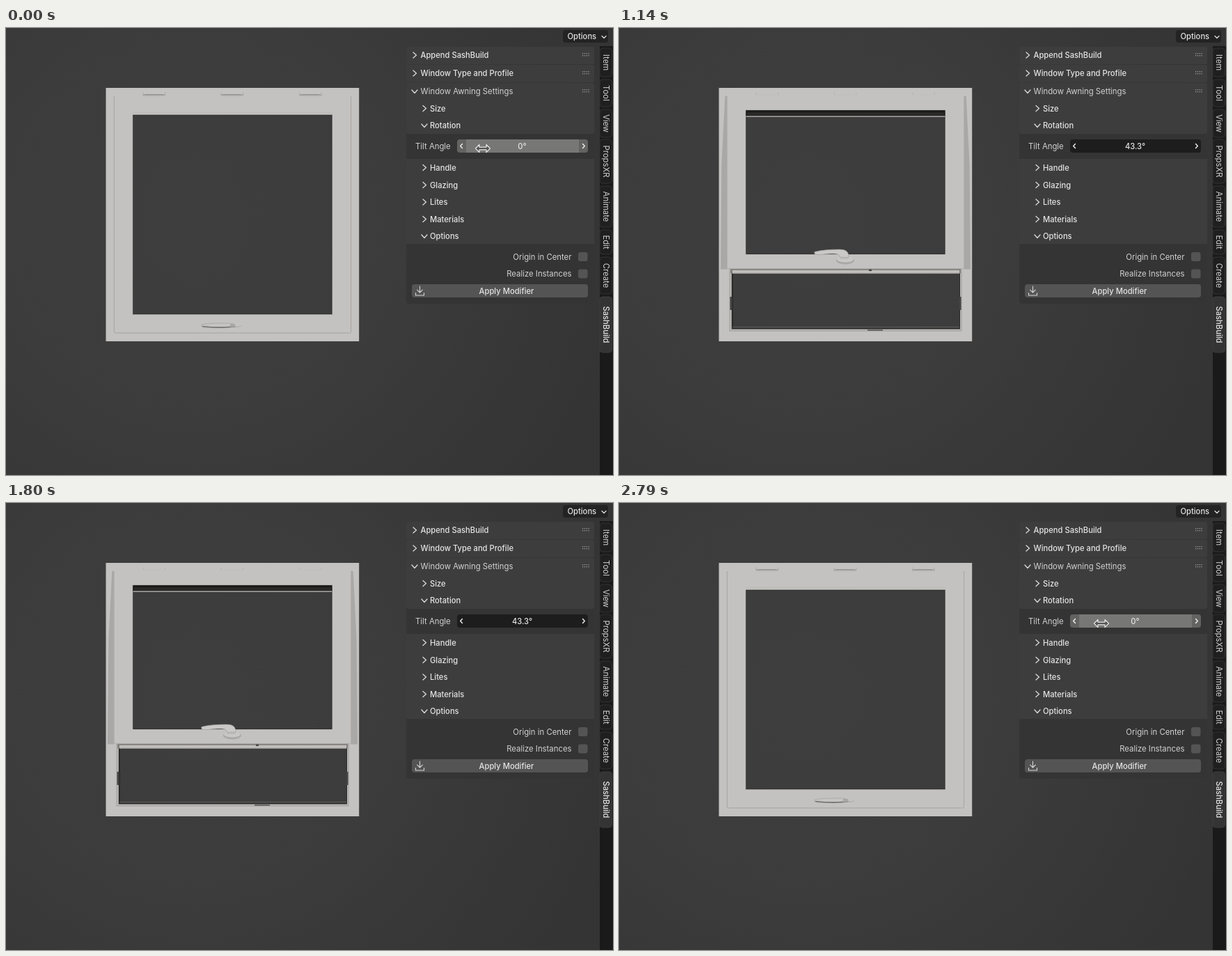
Write an HTML page with a canvas that moves like this. It is 872 px wide and 642 px high and loops after 2880 ms.

```html
<!DOCTYPE html>
<html lang="en">
<head>
<meta charset="utf-8">
<title>Awning window tilt</title>
<style>
  html, body { margin: 0; width: 100%; height: 100%; overflow: hidden; }
  body { background: radial-gradient(circle 640px at 270px 275px, #3e3e3e 0%, #3c3c3c 45%, #373737 75%, #343434 100%); }
  canvas, svg { position: absolute; left: 0; top: 0; }
  text { font: 500 11.2px Inter, "Open Sans", sans-serif; fill: #e4e4e4; }
  text.dim { font-weight: 400; font-size: 11.35px; fill: #d2d2d2; }
</style>
</head>
<body>
<canvas id="view" width="872" height="642"></canvas>
<svg id="ui" width="872" height="642" viewBox="0 0 872 642"></svg>
<script>
const LOOP = 2880, STEP = 30, TURN = 1470, GRAB = 300;
const ui = document.getElementById('ui');
const g = document.getElementById('view').getContext('2d');

// ---------- side panel ----------
function add(tag, attrs, content, parent = ui) {
  const el = document.createElementNS('http://www.w3.org/2000/svg', tag);
  for (const k in attrs) el.setAttribute(k, attrs[k]);
  if (content) el.textContent = content;
  parent.appendChild(el);
  return el;
}
const box = (x, y, width, height, fill, rx = 0) => add('rect', { x, y, width, height, fill, rx });
const label = (s, x, y, anchor = 'start', cls = '') =>
  add('text', { x, y: y + 4, 'text-anchor': anchor, class: cls }, s);
const line = (d, stroke = '#d6d6d6', w = 1.4) =>
  add('path', { d, stroke, fill: 'none', 'stroke-width': w, 'stroke-linecap': 'round', 'stroke-linejoin': 'round' });
const chevron = (x, y, open) =>
  line(open ? `M${x - 4} ${y - 2}l4 4.5l4-4.5` : `M${x - 2} ${y - 4}l4.5 4l-4.5 4`);

box(800, 3, 65, 18, '#232323', 4);
label('Options', 806.5, 12);
line('M856 11.5l3 3l3-3');

box(575, 79, 270, 317, '#343434', 4);
box(575, 27, 270, 25, '#3d3d3d', 3);
box(575, 53, 270, 25, '#3d3d3d', 3);
box(575, 79, 270, 73, '#3d3d3d', 3);
box(575, 188, 270, 122, '#3d3d3d');

[['Append SashBuild', 39], ['Window Type and Profile', 65], ['Window Awning Settings', 91]].forEach(([s, y], i) => {
  chevron(587, y, i === 2);
  label(s, 595.5, y, 'start', i === 2 ? 'dim' : '');
  for (let k = 0; k < 8; k++) box(828 + (k % 4) * 2.8, y - 3 + (k >> 2) * 3, 1.3, 1.3, '#999');
});
[['Size', 115.5], ['Rotation', 140, 1], ['Handle', 200.5], ['Glazing', 225.5], ['Lites', 250],
  ['Materials', 274.5], ['Options', 299, 1]].forEach(([s, y, open]) => {
  chevron(601, y, open);
  label(s, 609, y);
});
label('Tilt Angle', 588, 169.5, 'start', 'dim');
['Origin in Center', 'Realize Instances'].forEach((s, i) => {
  label(s, 812.5, 328.5 + i * 24.5, 'end', 'dim');
  box(822, 322 + i * 24.5, 13.5, 13, '#545454', 3);
});
box(583, 368, 253, 19, '#545454', 4);
label('Apply Modifier', 719, 377.5, 'middle');
line('M594.5 371v9m-3.8-3.8l3.8 3.8l3.8-3.8M588.5 380.5v3.5h12v-3.5', '#d6d6d6', 1.1);

const field = box(648, 160, 188, 19, '#1d1d1d', 4);
const fieldMid = box(661, 160, 162, 19, '#777775');
const value = label('0°', 741.5, 169.5, 'middle');
line('M655.5 166.5l-2.8 3l2.8 3', '#eee');
line('M828.5 166.5l2.8 3l-2.8 3', '#eee');
const cursor = add('path', {
  d: 'M-10.5 0l5.5-5.5v3.7h10v-3.7l5.5 5.5l-5.5 5.5v-3.7h-10v3.7z',
  fill: '#555', stroke: '#e6e6e6', 'stroke-width': 1.2, 'stroke-linejoin': 'round'
});

box(853, 26, 19, 616, '#1a1a1a');
[['Item', 29, 70], ['Tool', 74, 113], ['View', 117, 157], ['PropsXR', 160, 223], ['Animate', 227, 286],
  ['Edit', 290, 325], ['Create', 329, 382], ['SashBuild', 386, 466]].forEach(([s, top, end], i) => {
  const tab = box(853, top, 17.5, end - top, i === 7 ? '#343434' : '#1f1f1f', 4);
  tab.setAttribute('stroke', i === 7 ? '#3c3c3c' : '#323232');
  add('text', { transform: `translate(857.7 ${(top + end) / 2}) rotate(90)`, 'text-anchor': 'middle', class: i === 7 ? '' : 'dim' }, s);
});

// ---------- motion ----------
const keys = [[420, 0], [660, 1.8], [900, 9.23], [1140, 43.3], [1320, 65.5], [1470, 77]];
function tilt(m) {
  if (m <= keys[0][0]) return 0;
  const last = keys.length - 1;
  const i = Math.min(last - 1, keys.findLastIndex(k => k[0] <= m));
  const slope = j => j <= 0 || j >= last ? 0 :
    (keys[j + 1][1] - keys[j - 1][1]) / (keys[j + 1][0] - keys[j - 1][0]);
  const [t0, a] = keys[i], [t1, b] = keys[i + 1];
  const d = t1 - t0, u = (m - t0) / d, v = 1 - u;
  return a * v * v * (1 + 2 * u) + b * u * u * (3 - 2 * u) + d * u * v * (slope(i) * v - slope(i + 1) * u);
}
function format(a) {
  if (a < 0.005) return '0°';
  return +a.toFixed(a < 10 ? 2 : 1) + '°';
}

// ---------- window ----------
const FACE = '#c4c2c0';
const PIVOT = 96;
function rect(x0, y0, x1, y1, fill) {
  if (y1 <= y0) return;
  g.fillStyle = fill;
  g.fillRect(x0, y0, x1 - x0, y1 - y0);
}
function poly(points, fill) {
  g.fillStyle = fill;
  g.beginPath();
  points.forEach(p => g.lineTo(...p));
  g.fill();
}

function drawShadow(yb, s) {
  if (s < 0.01) return;
  const w = Math.min(9, 3 + s * 9) * Math.min(1, s * 8);
  const bottom = Math.min(yb + 1, 440), mid = 97 + (bottom - 97) * 0.4;
  const side = (x, dir) => poly([[x - dir, 97], [x + dir * w * 0.3, 98], [x + dir * w * 0.85, mid],
    [x + dir * w, bottom], [x - dir, bottom]], '#aaa8a6');
  side(155, -1);
  side(496, 1);
  const fade = Math.max(0, 1 - s / 0.45);
  if (!fade) return;
  g.globalAlpha = fade;
  g.fillStyle = '#aaa8a6';
  g.beginPath();
  g.roundRect(155 - w, yb - 12, 341 + 2 * w, 12 + Math.min(10, s * 62), 7);
  g.fill();
  g.globalAlpha = 1;
}

function drawOpening(yb) {
  if (yb > 432) return;
  rect(158.5, 100, 492.5, 435.5, '#a09e9b');
  rect(159.5, 100, 491.5, 434.5, '#bab8b5');
  rect(161.8, 100, 490, 432.5, '#2a2a29');
  g.clearRect(163.5, 100, 325.5, 330.5);
  rect(163, 429, 489, 429.8, '#686765');
  [280, 386].forEach(y => {
    rect(159.5, y, 162.5, y + 19, '#444342');
    rect(488.5, y, 491.5, y + 19, '#444342');
  });
  rect(357, 432.8, 379, 435, '#6b6967');
}

function drawHandle(c, s) {
  const base = PIVOT + 331 * c - 2 * s, lever = base - 18 * s;
  const open = s > 0.3;
  // mounting plate
  const plate = 4 * c * Math.min(1, s * 2);
  g.fillStyle = open ? '#aaa8a6' : '#b3b1af';
  g.beginPath();
  g.ellipse(325, base - 4 * s + 1, 13, 2 + plate * 1.25, 0, 0, 7);
  g.fill();
  g.fillStyle = '#c9c7c5';
  g.beginPath();
  g.ellipse(325, base - 5 * s, 12, 1.5 + plate, 0, 0, 7);
  g.fill();
  if (open) rect(317.5, lever + 3, 330, base - 5 * s, '#bebcba');
  // lever, bending towards the plate as it turns
  const bend = 2 + 6 * s, lift = 3 * s;
  g.save();
  g.translate(0, lever);
  g.beginPath();
  g.moveTo(281, -s - 1);
  g.bezierCurveTo(292, -3 - 0.7 * lift, 304, -3 - lift, 317, -3 - lift);
  g.bezierCurveTo(327, -3 - lift, 330, -1, 330, bend);
  g.lineTo(317.5, bend);
  g.bezierCurveTo(317, 3 - lift, 312, 3 - lift, 304, 3 - lift);
  g.bezierCurveTo(297, 3 - lift, 291, 3, 284, 3 - s);
  g.quadraticCurveTo(280, 2, 281, -s - 1);
  g.fillStyle = open ? '#cbc9c7' : s > 0.08 ? '#a9a7a5' : '#c6c4c2';
  g.fill();
  g.lineWidth = 0.7;
  g.strokeStyle = '#a3a19f';
  g.stroke();
  if (!open) {
    g.beginPath();
    g.moveTo(282, 1.5);
    g.quadraticCurveTo(305, 4.5, 329, 2);
    g.strokeStyle = '#747270';
    g.lineWidth = 1.6;
    g.stroke();
    rect(322, -2, 329, 2.5, s > 0.08 ? '#868482' : '#a9a7a5');
  }
  g.restore();
}

function drawUnderside(yb, s) {
  const y = yb + 14.5 * s * s;
  rect(160, yb, 491, y, s > 0.8 ? '#4f4845' : '#85817e');
  rect(163, yb + 5 * s * s, 489, y, '#c1bfbc');
  rect(163, y - 1, 489, y, '#aeaca9');
  if (s > 0.7) {
    rect(176, yb, 194, yb + 3.2, '#b5b3b0');
    rect(457, yb, 475, yb + 3.2, '#b5b3b0');
    rect(346, yb + 1, 362, yb + 4, '#93918e');
  } else rect(359, yb + 1, 363, yb + 3.5, '#484745');
}

function drawWindow(angle) {
  const r = angle * Math.PI / 180, c = Math.cos(r), s = Math.sin(r);
  const at = (a, depth) => PIVOT + a * c + depth * s;
  const yb = at(342, 1), top = at(29, 2), low = at(315, -1);
  g.clearRect(0, 0, 872, 642);
  rect(143.5, 86, 507.2, 450, FACE);
  drawShadow(yb, s);
  drawOpening(yb + 12 * s);
  if (s > 0.3) drawUnderside(yb, s);

  // sash face
  rect(155, 96, 496, yb, FACE);
  g.strokeStyle = s > 0.3 ? '#b0aeac' : '#a6a4a2';
  g.lineWidth = 1;
  g.beginPath();
  g.moveTo(155.3, 98);
  g.lineTo(155.3, yb - 2);
  g.quadraticCurveTo(155.3, yb, 157.5, yb);
  g.lineTo(493.5, yb);
  g.quadraticCurveTo(495.6, yb, 495.6, yb - 2);
  g.lineTo(495.6, 98);
  g.stroke();
  if (s < 0.1) rect(182, top - 3.5, 469, top - 2.7, '#b7b5b3');

  // hinges
  [196.5, 308.5, 421].forEach(x => {
    g.globalAlpha = Math.max(0, 1 - s * 1.4);
    rect(x, 95, x + 32.5, 97.5, '#aaa8a6');
    rect(x + 3, 95, x + 29, 96, '#91908e');
    g.globalAlpha = 0.8 - 0.4 * s;
    rect(x, 92.5, x + 1.2, 96, '#aaa8a6');
    rect(x + 31.5, 92.5, x + 32.7, 96, '#aaa8a6');
  });
  g.globalAlpha = 1;

  // glass opening with the top rail's lower side
  rect(181.8, top - 0.7, 469, low + 0.7, '#8e8c8a');
  g.clearRect(182.5, top, 285.8, low - top);
  g.strokeStyle = '#302f2e';
  g.lineWidth = 0.8;
  g.strokeRect(182.8, top + 0.3, 285.2, low - top - 0.6);
  if (s > 0.02) {
    const edge = top + Math.max(2, 11.5 * s);
    rect(182.5, top, 468.3, edge, '#1c1b1a');
    if (s > 0.3) {
      rect(184, top + 3, 467, edge - 1, s > 0.8 ? '#45403a' : '#2b2a28');
      rect(182.5, edge, 468.3, edge + 1.9 * s, '#bcbab7');
    }
  }
  drawHandle(c, s);
}

// ---------- playback ----------
function show(time) {
  const t = Math.min(2790, Math.floor(time % LOOP / STEP) * STEP);
  const m = t <= TURN ? t : 2 * TURN - t;
  const angle = tilt(m), hover = m < GRAB;
  drawWindow(angle);
  value.textContent = format(angle);
  field.setAttribute('fill', hover ? '#636362' : '#1d1d1d');
  fieldMid.setAttribute('visibility', hover ? 'visible' : 'hidden');
  cursor.setAttribute('visibility', hover ? 'visible' : 'hidden');
  const x = m > 150 ? 696 : 685 + 8 * m / 150;
  cursor.setAttribute('transform', `translate(${x} 173)`);
}
const start = performance.now();
function tick() {
  show(performance.now() - start);
  requestAnimationFrame(tick);
}
tick();
</script>
</body>
</html>
```
